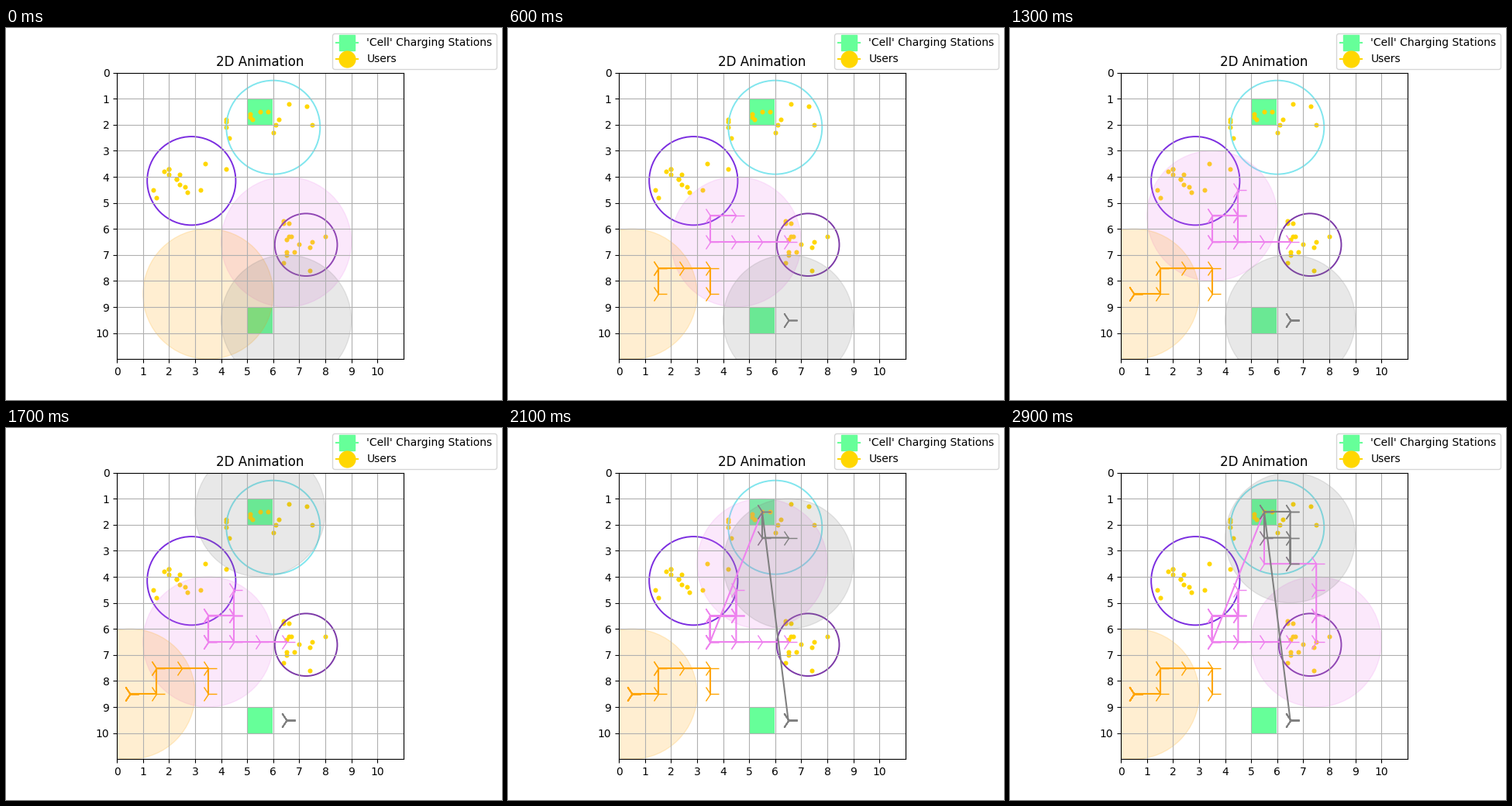
These frames come from a looping animation (640x480 px, 3000 ms). A matplotlib script:

```python
import matplotlib.pyplot as plt
import numpy as np
from matplotlib.animation import FuncAnimation
from matplotlib.lines import Line2D
from matplotlib.patches import Circle, Rectangle

FRAMES, INTERVAL = 30, 100
GREEN, GOLD = "#66ff99", "gold"
CHARGER = (5.5, 1.5)
MOVES = {"L": (-1, 0), "R": (1, 0), "U": (0, -1), "D": (0, 1), ".": (0, 0)}

# Outline centre, radius and colour; mean place and spread of the users.
GROUPS = [
    ((6.0, 2.1), 1.8, "#80e6ee", (5.8, 1.8), (1.0, 0.3)),
    ((2.86, 4.155), 1.7, "#7b2de0", (2.6, 4.0), (0.8, 0.55)),
    ((7.26, 6.61), 1.2, "#7c39a8", (7.0, 6.4), (0.5, 0.5)),
]

# Colour, start and one move per step; C jumps to the charging station.
ROUTES = [
    ("violet", (6.5, 6.5), "LLLURDLURUD.L.D...CDDRRDD..D"),
    ("orange", (3.5, 8.5), "ULL.DL"),
    ("gray", (6.5, 9.5), "." * 16 + "C.DRD.UU.L.RD"),
]


def walk(start, moves):
    path = [start]
    for m in moves.ljust(FRAMES - 1, "."):
        if m == "C":
            path.append(CHARGER)
        else:
            (x, y), (dx, dy) = path[-1], MOVES[m]
            path.append((x + dx, y + dy))
    return path


def scatter_users(rng, center, radius, mean, spread, count=15):
    """Cluster users on a 0.1 grid, pulled inside the group's circle."""
    offset = rng.normal(mean, spread, (count, 2)) - center
    dist = np.hypot(*offset.T)[:, None]
    return (center + offset * np.minimum(1, radius / dist)).round(1)


fig, ax = plt.subplots(figsize=(6.4, 4.8), dpi=100)
ax.set_aspect("equal")
ax.set_xlim(0, 11)
ax.set_ylim(11, 0)
ax.set_xticks(range(11))
ax.set_yticks(range(11))
ax.grid(True)
ax.set_title("2D Animation")

for y in (1, 9):
    ax.add_patch(Rectangle((5, y), 0.97, 1, fc=GREEN, lw=0))

rng = np.random.default_rng(4)
for center, radius, color, mean, spread in GROUPS:
    users = scatter_users(rng, center, radius, mean, spread)
    ax.scatter(*users.T, s=19, color=GOLD, linewidths=0)
    ax.add_patch(Circle(center, radius, fill=False, ec=color, lw=1.4))

drones = []
for color, start, moves in ROUTES:
    area = ax.add_patch(Circle(start, 2.5, color=color, alpha=0.18))
    trail, = ax.plot([], [], color=color, marker="4", ms=16)
    drones.append((walk(start, moves), area, trail))

fig.legend(handles=[
    Line2D([], [], color=GREEN, marker="s", ms=15,
           label="'Cell' Charging Stations"),
    Line2D([], [], color=GOLD, marker="o", ms=15, label="Users"),
])


def update(i):
    for path, area, trail in drones:
        area.center = path[i]
        past = path[:i]
        trail.set_data([p[0] for p in past], [p[1] for p in past])
    return [artist for d in drones for artist in d[1:]]


anim = FuncAnimation(fig, update, frames=FRAMES, interval=INTERVAL,
                     repeat=True, repeat_delay=0)
plt.show()
```
